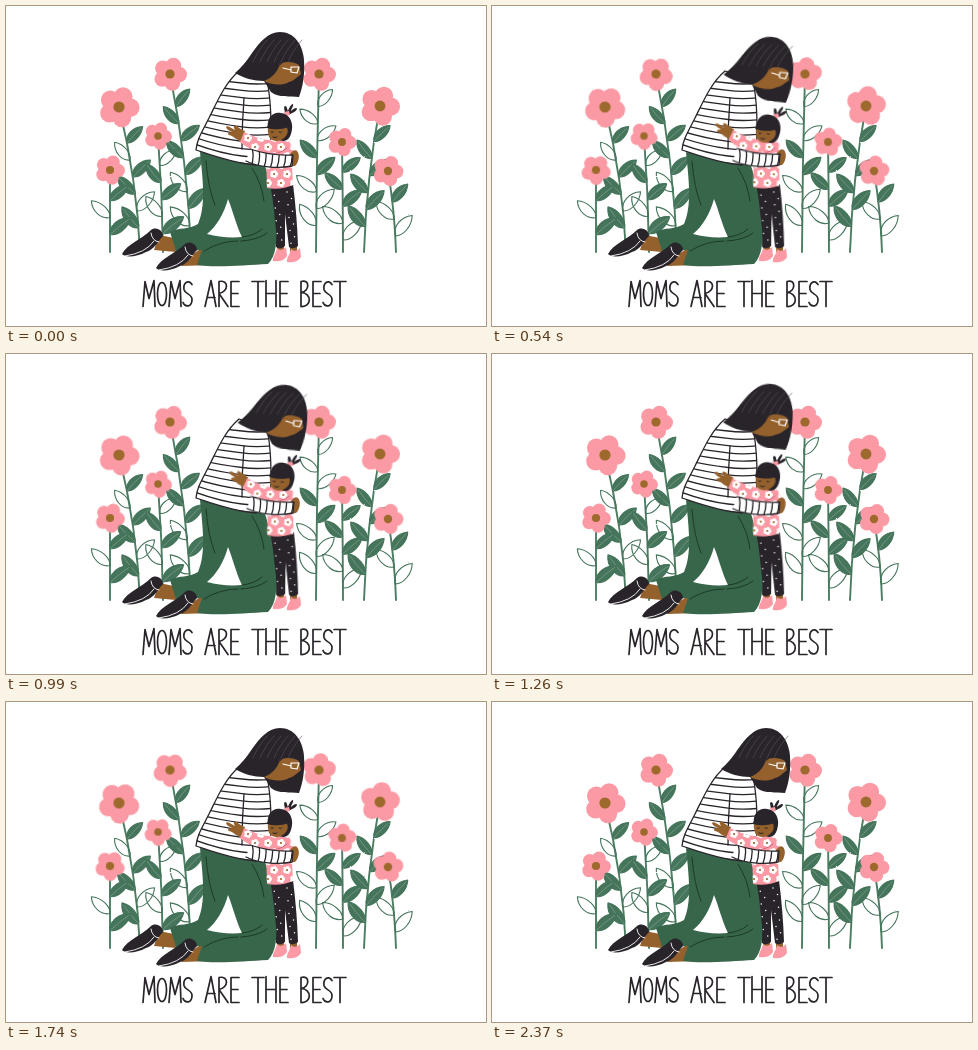
These frames come from a looping animation (480 px wide and 320 px high, 2.4 s). An HTML page:

```html
<!DOCTYPE html>
<html lang="en">
<head>
<meta charset="utf-8">
<title>Moms are the best</title>
<style>
  html, body { margin: 0; width: 100%; height: 100%; overflow: hidden; background: #fff; }
  svg { display: block; width: 100vw; height: 100vh; }
  path { stroke-linecap: round; stroke-linejoin: round; }
  .ink { fill: #28242a; }
  .skin { fill: #94602c; }
  .pink { fill: #fb9aa4; }
  .pants { fill: #37664a; }
  .white { fill: #fff; }
  .line { fill: none; stroke: #28242a; stroke-width: 1.3; }
  .fine { fill: none; stroke: #1d3a2a; stroke-width: 1; }
  .stem { fill: none; stroke: #4b7d61; stroke-width: 1.9; }
  .leaf { stroke: #44745a; stroke-width: 1.1; }
  .full { fill: #44745a; }
  .vein { fill: none; stroke: #7f9f8d; stroke-width: .7; }
  .lean { animation: lean 2.4s infinite ease-in-out; }
  .bloom { animation: sway 1.2s infinite ease-in-out; }
  #head { --x: 2px; --y: 2px; --a: 4deg; transform-origin: 235px 75px; }
  #body { --x: 0px; --y: 0px; --a: 3deg; transform-origin: 277px 185px; }
  #face { --x: -1px; --y: 2px; --a: 1deg; transform-origin: 273px 130px; }
  #legs { --x: 0px; --y: 0px; --a: .7deg; transform-origin: 279px 252px; }
  #hug { --x: 1px; --y: -.5px; --a: -.6deg; transform-origin: 245px 150px; }
  @keyframes lean {
    0%, 72.5%, 100% { transform: none; }
    25%, 44% { transform: translate(var(--x), var(--y)) rotate(var(--a)); }
  }
  @keyframes sway {
    0%, 100% { transform: rotate(0deg); }
    47% { transform: rotate(var(--a)); }
  }
</style>
</head>
<body>
<svg viewBox="0 0 480 320" role="img" aria-label="Moms are the best">
  <defs>
    <filter id="pencil">
      <feTurbulence type="fractalNoise" baseFrequency=".5" numOctaves="2" seed="4"/>
      <feDisplacementMap in="SourceGraphic" scale="1.6" xChannelSelector="R" yChannelSelector="G"/>
    </filter>
    <clipPath id="shirtClip"><path id="shirt" d="M233 65C219 77 212 94 203 112C196 126 191 133 190 144C205 149 226 157 250 159L264 148Q267 105 261 74Z"/></clipPath>
    <clipPath id="armClip"><path id="arm" d="M244 143C256 147 271 150 287 149L286 160C272 163 252 161 240 155"/></clipPath>
    <clipPath id="topClip"><path id="top" d="M262 134C254 133 246 130 238 126L234 136C242 143 251 146 260 148L261 182C271 184 280 182 287 179L286 160C292 152 287 137 280 133Z"/></clipPath>
  </defs>

  <g id="leaves" filter="url(#pencil)"></g>
  <g id="flowers"></g>

  <g id="legs" class="lean">
    <path class="skin" d="M271 236h7v10h-7zM284 236h7v10h-7z"/>
    <path id="foot" class="pink" d="M271 242C274 245 277 244 280 241L281 250C278 255 271 256 267 255C266 251 270 248 271 242Z"/>
    <use href="#foot" x="14" y="1"/>
    <path class="ink" d="M262 179Q276 183 287 178Q291 210 292 240Q287 244 283 241L279 208L279 240Q274 244 270 241Q268 210 262 179Z"/>
    <g id="dots" class="white"></g>
  </g>

  <path class="skin" d="M153 229L173 233L170 246L148 244ZM182 251L196 242L206 259L175 260Z"/>
  <path class="pants" d="M194 146C197 175 200 200 192 218C183 224 173 221 164 226L170 245L196 244L191 259C210 262 240 259 262 258C270 250 272 235 269 215C267 190 264 174 258 157Z"/>
  <path class="white" d="M222 193C227 205 230 219 236 231C224 232 212 231 201 228C210 221 218 208 222 193Z"/>
  <path class="fine" d="M200 155Q202 182 209 199M236 231Q248 230 256 223M235 235Q252 234 261 227M198 245Q214 235 232 235M246 162Q256 178 258 195"/>
  <g id="shoe">
    <path class="ink" d="M116 248C121 238 136 233 145 224C151 220 157 225 157 230C152 235 148 244 140 246C131 251 119 252 116 248Z"/>
    <path fill="none" stroke="#fff" stroke-width=".9" d="M119 250Q140 247 148 235M145 227Q146 235 153 236"/>
  </g>
  <use href="#shoe" x="34" y="14"/>

  <g clip-path="url(#shirtClip)">
    <path class="white" d="M180 60h90v105h-90z"/>
    <g id="stripes" class="line"></g>
  </g>
  <use href="#shirt" class="line"/>
  <path class="line" d="M238 92Q236 118 236 143"/>

  <g id="body" class="lean">
    <path class="skin" d="M239 125C234 124 230 118 228 120C227 122 229 123 229 124C225 122 221 119 220 121C220 123 224 125 226 126C222 126 221 128 223 129C228 130 230 135 237 135Z"/>
    <use href="#top" class="pink"/>
    <g id="daisies" clip-path="url(#topClip)"></g>
    <path fill="none" stroke="#cf6478" d="M260 148Q273 149 281 142"/>
    <g id="face" class="lean">
      <path class="ink" d="M279 108C279 104 277 101 279 100C281 100 281 103 282 105C283 102 285 98 287 98C288 100 285 103 285 105C288 102 291 101 291 103C290 106 285 107 283 109Z"/>
      <path class="pink" d="M278 106l5-1 1 4-5 1z"/>
      <path class="ink" d="M262 123C260 112 267 105 275 107C283 108 287 115 286 123C285 131 282 135 277 135L265 132Z"/>
      <path class="skin" d="M262 120H280C283 124 282 129 278 132C274 136 266 136 263 131Q261 125 262 120Z"/>
      <path class="ink" d="M261 121C265 113 277 112 283 121Q272 125 261 122Z"/>
      <path class="line" style="stroke-width:1" d="M265 126q1 1 2.4 0M273 126q1 1 2.4 0M267 131q2 1.5 4 0"/>
    </g>
  </g>

  <g id="hug" class="lean">
    <path class="skin" d="M283 150C285 146 288 143 291 145C294 148 293 155 290 159C288 161 285 160 283 159Z"/>
    <g clip-path="url(#armClip)">
      <path class="white" d="M235 140h55v25h-55z"/>
      <g id="cuffs" class="line"></g>
    </g>
    <use href="#arm" class="line"/>
  </g>

  <g id="head" class="lean">
    <path class="ink" d="M274 26C262 26 254 36 246 47C240 56 235 62 229 67C237 72 248 75 258 75L265 86C273 92 284 90 293 91C297 81 299 67 298 55C297 38 288 26 274 26Z"/>
    <path class="skin" d="M258 75C266 72 272 66 274 57Q286 54 293 59L295 68C291 71 288 75 283 76C276 80 265 79 258 75Z"/>
    <path class="ink" d="M273 61C277 53 290 52 298 60L297 48L278 46Z"/>
    <path fill="none" stroke="#fff" stroke-width="1.2" d="M277 62L285 64M285 61L293 61L291 67L285 66Z"/>
    <g id="strands" fill="none" stroke="#59525a" stroke-width=".6"></g>
  </g>

  <g id="title" fill="none" stroke="#28242a" stroke-width="1.7"></g>
</svg>

<script>
const NS = 'http://www.w3.org/2000/svg';
const $ = id => document.getElementById(id);

function add(parent, tag, attrs = {}) {
  const el = document.createElementNS(NS, tag);
  for (const key in attrs) el.setAttribute(key, attrs[key]);
  return parent.appendChild(el);
}

let seed = 11;
const random = () => (seed = seed * 16807 % 2147483647) / 2147483647;

// Circles placed evenly around a centre
function petals(parent, cls, r, turn = 0) {
  for (let i = 0; i < 5; i++) {
    const a = turn + i * Math.PI * .4;
    add(parent, 'circle', { class: cls, cx: Math.cos(a) * r * .56, cy: Math.sin(a) * r * .56, r: r * .47 });
  }
  add(parent, 'circle', { fill: '#9d692c', r: r * .28 });
}

function addLeaf(parent, x, y, angle, len, full) {
  const g = add(parent, 'g', { transform: `translate(${x} ${y}) rotate(${angle})` });
  const w = len * .3;
  add(g, 'path', {
    class: full ? 'leaf full' : 'leaf', fill: 'none',
    d: `M0 0C${len * .2} ${-w} ${len * .7} ${-w} ${len} 0C${len * .7} ${w * .8} ${len * .2} ${w * .8} 0 0Z`
  });
  if (full) add(g, 'path', { class: 'vein', d: `M1 0Q${len / 2} -1 ${len * .9} 0` });
}

// Leaves alternate down the stem and grow towards the ground
function addPlant(x, y, footX, r) {
  const ground = 246, gap = 17;
  const bow = (x + footX) / 2 + (footX - x) * .35;
  add($('leaves'), 'path', { class: 'stem', d: `M${x} ${y}Q${bow} ${(y + ground) / 2} ${footX} ${ground}` });
  let side = 1;
  for (let d = r + 16; d < ground - y - 10; d += gap) {
    const t = d / (ground - y);
    const stemX = (1 - t) ** 2 * x + 2 * t * (1 - t) * bow + t * t * footX;
    const angle = -90 + side * (38 + random() * 14);
    addLeaf($('leaves'), stemX, y + d, angle, 21 + 7 * t, random() < .6);
    side = -side;
  }
  const spot = add($('flowers'), 'g', { transform: `translate(${x} ${y})` });
  const bloom = add(spot, 'g', { class: 'bloom', style: `--a:${x < 240 ? 12 : -12}deg` });
  petals(bloom, 'pink', r, -1.2);
}

addPlant(164, 68, 185, 16.5);
addPlant(113, 101, 134, 20);
addPlant(152, 130, 157, 13.5);
addPlant(104, 164, 104, 14.5);
addPlant(313, 68, 310, 16.5);
addPlant(336, 136, 337, 14);
addPlant(374, 100, 358, 19.5);
addPlant(382, 165, 390, 15);

for (let y = 74; y < 165; y += 7.3) {
  const slope = (y - 60) * .12;
  add($('stripes'), 'path', { d: `M185 ${y - slope}Q212 ${y} 236 ${y + 3}Q250 ${y + 5} 268 ${y + 3}` });
}
for (let x = 246; x < 287; x += 6.5) add($('cuffs'), 'path', { d: `M${x} 142q3 10 -2 22` });
for (let x = 252; x < 290; x += 7) add($('strands'), 'path', { d: `M${x + 9} 34Q${x} 44 ${x - 5} 56` });

for (let i = 0; i < 17; i++) {
  const y = 186 + i * 3.2;
  const x = (i % 2 ? 268 : 281) + i * .25 + (i % 4 > 1 ? 4 : 0);
  add($('dots'), 'circle', { cx: x, cy: y, r: .75 });
}

for (let row = 0; row < 6; row++) {
  for (let x = 242 + row % 2 * 7; x < 292; x += 13) {
    const daisy = add($('daisies'), 'g', { transform: `translate(${x} ${132 + row * 9})` });
    petals(daisy, 'white', 4);
  }
}

// Hand lettering: each glyph hangs from the cap line and is 26 units tall
const glyphs = {
  M: [14, 'M0 26L2 1L6 18L11 0L12 26'],
  O: [12, 'M5 2C-1 2 -1 25 5 25C11 25 11 2 5 2'],
  S: [11, 'M9 4C5 -2 0 3 1 9C2 14 9 13 9 19C9 27 2 27 0 22'],
  A: [14, 'M0 26L6 0L11 26M2 17H10'],
  R: [12, 'M0 26V1C10 -1 10 11 0 13L9 26'],
  E: [10, 'M8 1H0V26H8M0 13H7'],
  T: [14, 'M0 1H12M6 1V26'],
  H: [14, 'M0 0V26M10 0V26M0 13H10'],
  B: [12, 'M0 26V1C9 -2 9 11 0 12C11 12 11 27 0 26']
};
let pen = 137;
for (const letter of 'MOMS ARE THE BEST') {
  const [advance, d] = glyphs[letter] || [11, ''];
  if (d) add($('title'), 'path', { d, transform: `translate(${pen} 274.5)` });
  pen += advance;
}
</script>
</body>
</html>
```
